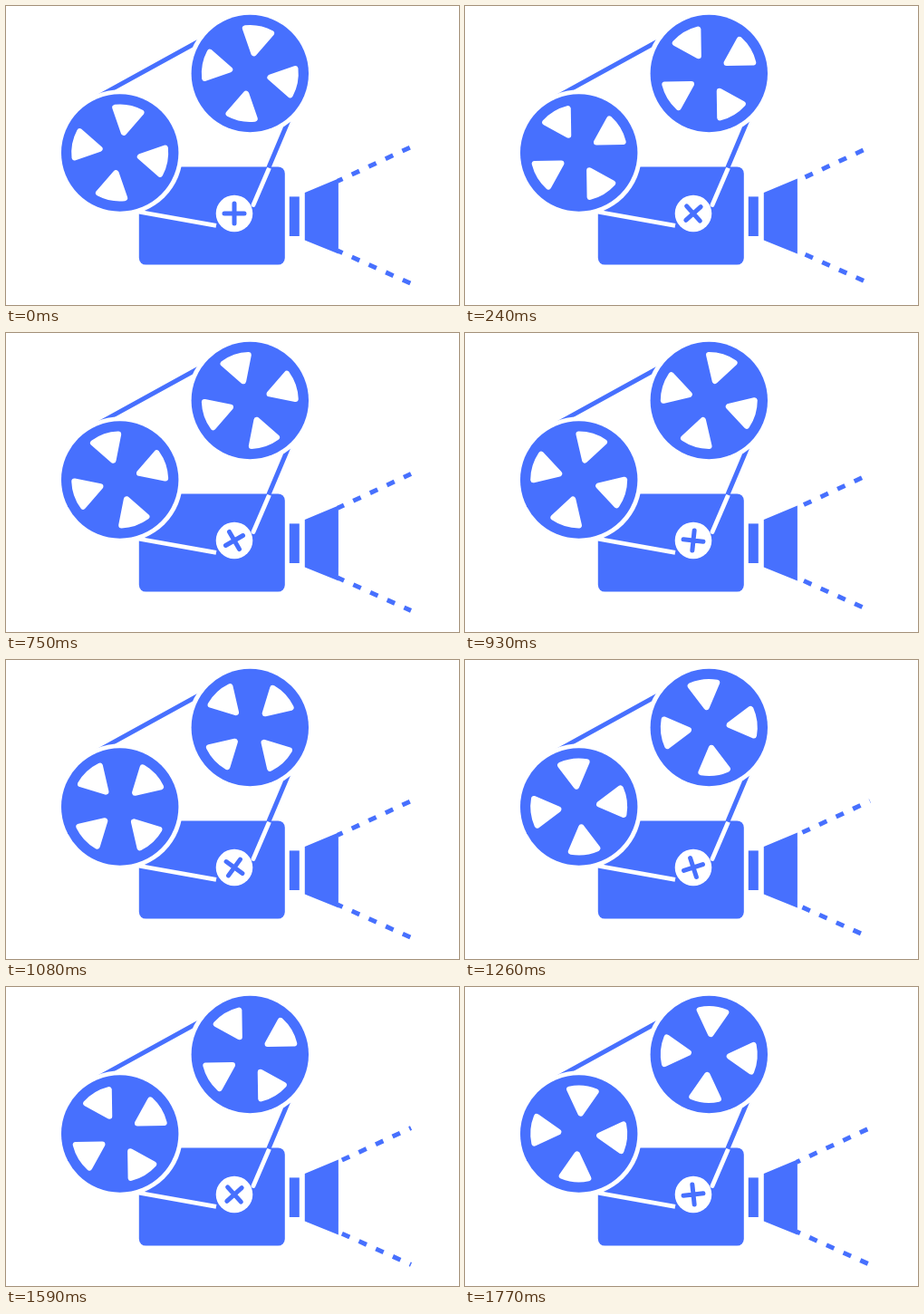
An HTML page that plays this animation: 500x330 px, repeating every 1800 ms.

```html
<!DOCTYPE html>
<html lang="en">
<head>
<meta charset="utf-8">
<title>Film camera</title>
<style>
  html, body { margin: 0; width: 100%; height: 100%; overflow: hidden; background: #fff; }
  svg { display: block; width: 500px; height: 330px; }
  .blue { fill: #4770fe; }
  .white { fill: #fff; }
  .line { fill: none; stroke: #4770fe; stroke-width: 5; }
  .cut { fill: none; stroke: #fff; stroke-width: 4.8; }
  .round { stroke-linecap: round; }
  .hole { fill: #fff; stroke: #fff; stroke-width: 6.6; stroke-linejoin: round; }
</style>
</head>
<body>
<svg viewBox="0 0 500 330">
  <defs>
    <path id="hole" class="hole" d="M0-22.8L-14.6-48A50.2 50.2 0 0 1 14.6-48Z"/>
    <g id="holes">
      <use href="#hole"/>
      <use href="#hole" transform="rotate(90)"/>
      <use href="#hole" transform="rotate(180)"/>
      <use href="#hole" transform="rotate(270)"/>
    </g>
    <g id="disc">
      <circle class="white" r="69.6"/>
      <circle class="blue" r="64.7"/>
    </g>
  </defs>

  <rect class="blue" x="146.8" y="177.4" width="161" height="108.2" rx="7.5"/>
  <path class="cut" d="M140 226L232 242.4"/>
  <path class="cut round" d="M290 180L273 219.5"/>
  <path class="line" d="M97 102.6L225 32.3M313 123.5L289.8 178.5"/>

  <g transform="translate(125.7 162)">
    <use href="#disc"/>
    <use href="#holes" class="reel"/>
  </g>
  <g transform="translate(269.3 74.5)">
    <use href="#disc"/>
    <use href="#holes" class="reel"/>
  </g>

  <g transform="translate(252 229)">
    <circle class="white" r="20.3"/>
    <path id="screw" class="line round" d="M-11 0H11M0-11V11"/>
  </g>

  <rect class="blue" x="312.8" y="210.4" width="11" height="43.6"/>
  <path class="blue" d="M329.8 206L366.9 190.4V273.6L329.8 258.4Z"/>
  <path class="line beam" d="M366 193.3L447 155.6"/>
  <path class="line beam" d="M366 270L447 306.4"/>
</svg>
<script>
  const LOOP = 1800, STEP = 30;
  const REEL_START = 11;
  const DASH = 9.2, DASH_PERIOD = 20.5, DASH_START = 3.2, DASH_TIME = 360;

  const reels = document.querySelectorAll('.reel');
  const beams = document.querySelectorAll('.beam');
  const screw = document.getElementById('screw');
  const rotate = (el, angle) => el.setAttribute('transform', `rotate(${angle})`);

  beams.forEach(el => el.setAttribute('stroke-dasharray', `${DASH} ${DASH_PERIOD - DASH}`));

  function draw(ms) {
    const t = Math.floor((ms % LOOP) / STEP) * STEP;
    const turn = 360 * t / LOOP;
    const flow = (t % DASH_TIME) / DASH_TIME;
    reels.forEach(el => rotate(el, REEL_START + turn));
    rotate(screw, turn);
    beams.forEach(el => el.setAttribute('stroke-dashoffset', DASH_START - DASH_PERIOD * flow));
  }

  const start = performance.now();
  function tick() {
    draw(performance.now() - start);
    requestAnimationFrame(tick);
  }
  tick();
</script>
</body>
</html>
```
